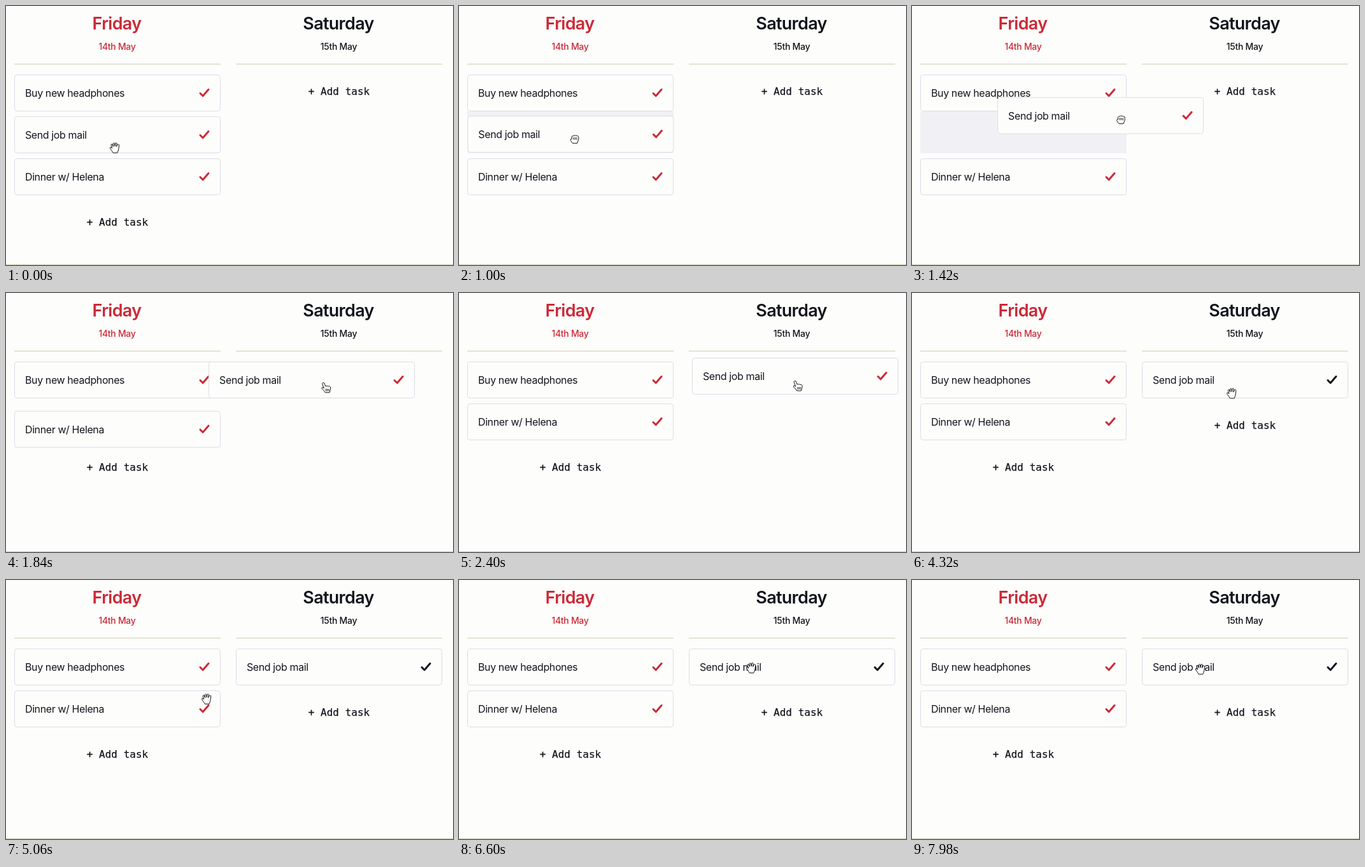
These frames come from a looping animation (702 by 408 pixels, 8000 ms). An HTML page:

```html
<!DOCTYPE html>
<html lang="en">
<head>
<meta charset="utf-8">
<title>Task board</title>
<style>
  html, body { margin: 0; width: 100%; height: 100%; overflow: hidden; background: #fdfdfc; }
  svg { display: block; width: 702px; height: 408px; }
  text { font-family: Inter, Roboto, sans-serif; font-size: 16px; letter-spacing: -.4px; fill: #12151b; }
  .day { font-size: 27px; font-weight: 600; letter-spacing: -.7px; text-anchor: middle; }
  .date { font-size: 14px; font-weight: 500; letter-spacing: -.3px; text-anchor: middle; }
  .today { fill: #cb2936; }
  .add { font-family: "DejaVu Sans Mono", monospace; letter-spacing: 0; text-anchor: middle; stroke: #12151b; stroke-width: .25; }
  .rule { stroke: #cfccb0; }
  .card rect { fill: #fdfdfc; stroke: #dcdce6; }
  .check { fill: none; stroke: #cb2936; stroke-width: 3; stroke-linecap: round; stroke-linejoin: round; }
  .done .check { stroke: #12151b; }
  #cursors path { fill: #fff; stroke: #111; stroke-linejoin: round; stroke-linecap: round; }
</style>
</head>
<body>
<svg viewBox="0 0 702 408">
  <text class="day today" x="174" y="37">Friday</text>
  <text class="date today" x="174.5" y="69">14th May</text>
  <text class="day" x="522" y="37">Saturday</text>
  <text class="date" x="522.5" y="69">15th May</text>
  <path class="rule" d="M13 91.5H337M361 91.5H685M0 407.5H702"/>
  <rect id="gap" x="13" y="166" width="324" height="66" fill="#f1f1f5"/>
  <text id="addFriday" class="add" x="175" y="0">+ Add task</text>
  <text id="addSaturday" class="add" x="523" y="0">+ Add task</text>
  <g id="cards"></g>
  <g id="cursors">
    <g id="open">
      <path d="M-3 8C-4 5.5-6.5 3.5-7.5 1q-.2-1.9 1.3-1.5L-4.3 1-6-4q.2-1.8 1.8-1.3L-2.6-1.5-2.8-6.5q1-1.7 2.2-.2L0-2 .8-6.8q1.3-1.4 2.3.2L2.6-1.5 4.4-5q1.6-.8 2.2.8L6 1.5Q5.5 5 4 8Z"/>
    </g>
    <g id="fist">
      <path d="M-4.5-4q1-2 2.8-1 1-1.5 2.5-.5 1.5-1 2.6.4 1.8-.5 2.6 1 .8 3-.2 6L4 6.5H-3Q-5.5 4-6.3 1.5-6.5-1-4.5-.8Z"/>
      <path d="M-1.6-2.5v3M.8-2.5v3M3.2-2.3v3"/>
    </g>
    <g id="pointer">
      <path d="M-6-6.5q1-2 3-.7L-1-2q1.3-1.2 2.5 0 1.4-.9 2.5.3 1.8-.6 2.8.9.8 3-.6 5.8L5.5 8H-1.5Q-3 5-6.5 2q-1-2 1-2.2L-3.6 1Z"/>
      <path d="M-.2 2.5v3M2 2.5v3M4.2 2.5v3"/>
    </g>
  </g>
</svg>
<script>
const LOOP = 8000, GRAB = 840, CROSS = 1680, SETTLE = 3640, HOVER = 4300;
const RISE_LEAD = 60; // vertical motion runs slightly ahead of horizontal
const $ = id => document.getElementById(id);

const ease = (t, from, to) => {
  const p = Math.min(1, Math.max(0, (t - from) / (to - from)));
  return p * p * (3 - 2 * p);
};

// Each move eases from wherever the last one ended.
function travel(t, [x, y], moves) {
  for (const { from, to, goal } of moves) {
    x += (goal[0] - x) * ease(t, from, to);
    y += (goal[1] - y) * ease(t + RISE_LEAD, from, to);
  }
  return [x, y];
}

const cardMoves = [
  { from: 980, to: 2100, goal: [366, 102] },
  { from: 3280, to: 3480, goal: [361, 116] }
];
const cursorMoves = [
  { from: 80, to: 300, goal: [175, 213] },
  { from: 910, to: 2040, goal: [532, 146] },
  { from: 4180, to: 4800, goal: [306, 193] },
  { from: 5000, to: 5500, goal: [530, 152] },
  { from: 5520, to: 5800, goal: [459, 138] },
  { from: 7540, to: 7900, goal: [453, 140] }
];

$("cards").innerHTML = ["Buy new headphones", "Dinner w/ Helena", "Send job mail"].map(label => `
  <g class="card">
    <rect x=".5" y=".5" width="323" height="57" rx="4"/>
    <text x="17" y="35">${label}</text>
    <path class="check" d="M292 29.5l4.2 4.2 8.8-10.2"/>
  </g>`).join("");
const [first, dinner, mail] = $("cards").children;

const place = (node, x, y) => node.setAttribute("transform", `translate(${x} ${y})`);
const show = (node, visible) => node.style.display = visible ? "" : "none";
place(first, 13, 108);

function draw(t) {
  const held = t >= GRAB && t < CROSS, settled = t >= SETTLE;
  place(dinner, 13, 240 - 66 * ease(t, CROSS, CROSS + 220));
  place(mail, ...(settled ? [361, 108] : travel(t, [13, 174], cardMoves)));
  mail.classList.toggle("done", settled);

  show($("gap"), held);
  show($("addFriday"), !held);
  $("addFriday").setAttribute("y", t < GRAB ? 346 : 280);
  show($("addSaturday"), t < CROSS || settled);
  $("addSaturday").setAttribute("y", settled ? 214 : 140);

  const cursor = t < GRAB || t >= HOVER ? "open" : held ? "fist" : "pointer";
  for (const node of $("cursors").children) show(node, node.id === cursor);
  place($("cursors"), ...travel(t, [171, 223], cursorMoves));
}

function tick(now) {
  draw(now % LOOP);
  requestAnimationFrame(tick);
}
draw(0);
requestAnimationFrame(tick);
</script>
</body>
</html>
```
